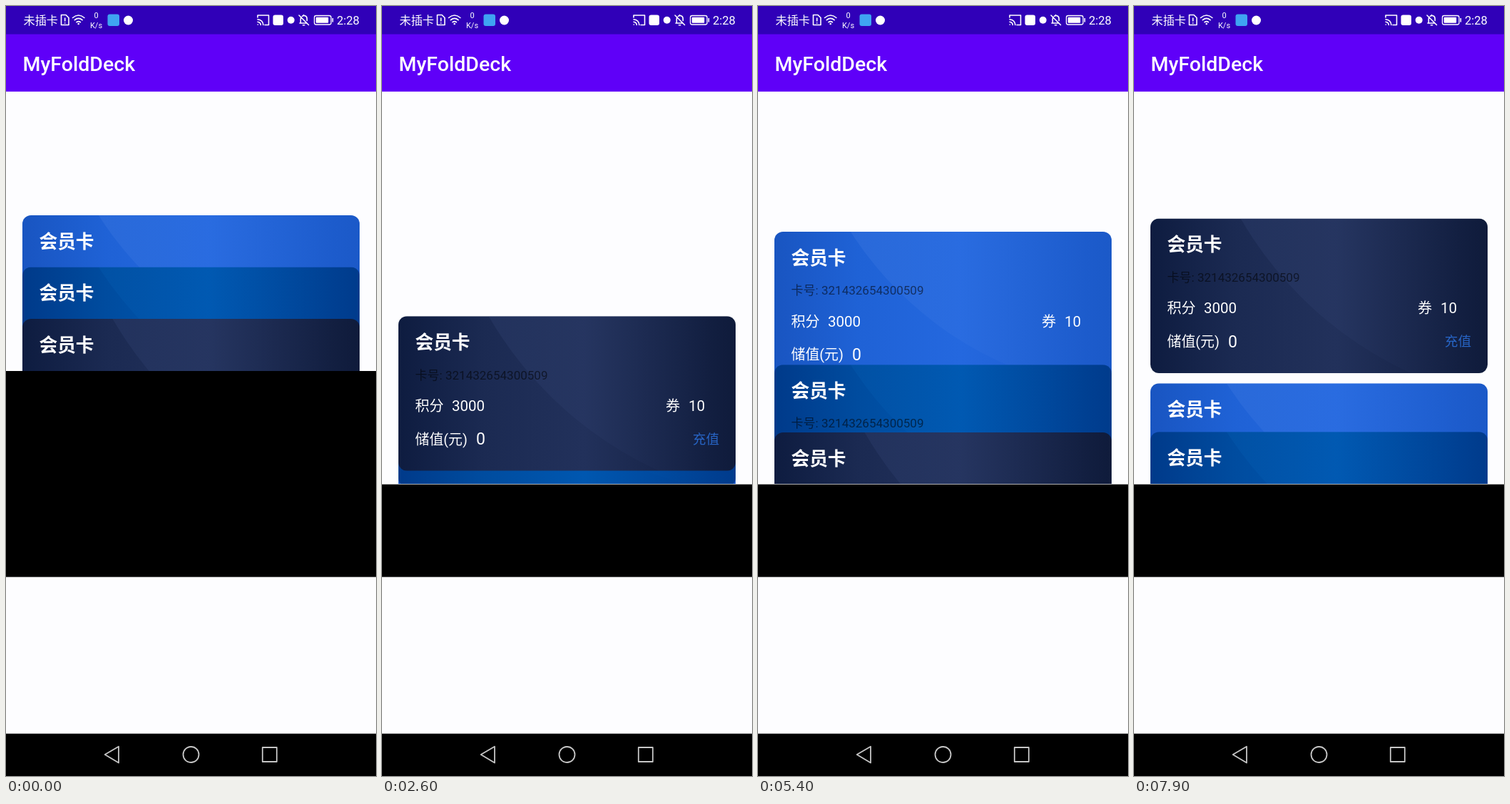
Write an HTML page that moves like this. It is 519 px wide and 1078 px high and loops after 8 s.

```html
<!DOCTYPE html>
<html lang="zh-CN">
<head>
<meta charset="utf-8">
<title>Card stack</title>
<style>
  html, body { margin: 0; width: 100%; height: 100%; overflow: hidden; background: #fdfdff; }
  svg { display: block; width: 100vw; height: 100vh; }
  text { font-family: Roboto, "Noto Sans CJK SC", "Noto Sans CJK", sans-serif; fill: #fff; }
  .line { fill: none; stroke: #fff; stroke-width: 1.6; stroke-linecap: round; stroke-linejoin: round; }
  .nav { fill: none; stroke: #c6c6c6; stroke-width: 1.8; stroke-linejoin: round; }
</style>
</head>
<body>
<svg viewBox="0 0 519 1078" preserveAspectRatio="none">
  <defs>
    <clipPath id="face"><rect width="473" height="216.5" rx="12"/></clipPath>
  </defs>
  <rect width="519" height="1078" fill="#fdfdff"/>
  <g id="cards"></g>
  <rect id="below" width="519" fill="#fdfdff"/>
  <rect id="black" width="519"/>

  <rect width="519" height="119.8" fill="#5f00f8"/>
  <rect width="519" height="39.5" fill="#3000b8"/>
  <text x="23.5" y="90.5" font-size="28.5" font-weight="500">MyFoldDeck</text>

  <text x="24.5" y="26" font-size="16.2">未插卡</text>
  <path class="line" d="M77.5 12.5h6.5l4 4v10h-10.5z"/>
  <path class="line" d="M82.7 17v4M82.7 23.8v.2"/>
  <path class="line" d="M93.5 16.5q8.2-7 16.4 0M96.3 19.7q5.4-4.5 10.8 0M99 22.7q2.7-2.2 5.4 0"/>
  <circle cx="101.7" cy="25" r="1.3" fill="#fff"/>
  <g font-size="11" text-anchor="middle">
    <text x="126.5" y="17">0</text>
    <text x="126.5" y="30.5">K/s</text>
  </g>
  <rect x="142.5" y="11.5" width="16.5" height="16.5" rx="3" fill="#3fa4f2"/>
  <circle cx="171.5" cy="20" r="6.5" fill="#fff"/>
  <path class="line" d="M353 16v-3h15.500v13.500h-5.500M353 18.800q7.300.7 7.800 7.700M353 22.200q4 .5 4.300 4.300M353.200 26h.2"/>
  <rect x="374.5" y="12.5" width="14.5" height="14.5" rx="3" fill="#fff"/>
  <circle cx="399.7" cy="19.7" r="5" fill="#fff"/>
  <path class="line" d="M411 13l13.5 13.5M412 24h9M413.3 24v-6q.2-1.5.8-2.5M415.5 14.3q2-1.5 4.2-.6 2.5 1 2.5 4.3v2.5M417.5 12.5v.5M416.5 26.7h2.2"/>
  <rect class="line" x="432.5" y="13.5" width="23.5" height="12.5" rx="2.5" style="stroke-width:1.3"/>
  <rect x="434.7" y="15.7" width="17.5" height="8.1" rx="1" fill="#fff"/>
  <rect x="457.5" y="17" width="1.6" height="5.5" fill="#fff"/>
  <text x="464" y="25.7" font-size="16.5">2:28</text>

  <rect y="1018.7" width="519" height="60"/>
  <path class="nav" d="M138.7 1048L158 1036.7V1059.5z"/>
  <circle class="nav" cx="259.5" cy="1048" r="11"/>
  <rect class="nav" x="359.8" y="1038" width="20" height="20"/>
</svg>
<script>
const LOOP = 8000, STEP = 100, FLOOR = 799.4, COVER = 288;
const $ = id => document.getElementById(id);

// Gradient across the face, arc centre and radius, arc tint, colour of the top-up link.
const styles = [
  { stops: ['#1955c1', '#1f62d6', '#2468df', '#1b59c8'], cx: 522, r: 493, glow: '#6f9cf0', link: '' },
  { stops: ['#003a8a', '#004c9f', '#0057b0', '#003b8c'], cx: 522, r: 493, glow: '#0a74cc', link: '#1760c2' },
  { stops: ['#0e1c40', '#1b2a52', '#22315b', '#0f1b3b'], cx: 585, r: 530, glow: '#5368a4', link: '#2764c4' }
];
const offsets = [0, .25, .55, 1];

const label = (x, y, size, str, extra = '') =>
  `<text x="${x}" y="${y}" font-size="${size}" ${extra}>${str}</text>`;

const card = ({ stops, cx, r, glow, link }, i) => `<g id="card${i}">
  <linearGradient id="tint${i}">${stops.map((c, k) =>
    `<stop offset="${offsets[k]}" stop-color="${c}"/>`).join('')}</linearGradient>
  <linearGradient id="glow${i}" gradientUnits="userSpaceOnUse" x1="100" x2="440">
    <stop offset="0" stop-color="${glow}" stop-opacity=".14"/>
    <stop offset="1" stop-color="${glow}" stop-opacity="0"/>
  </linearGradient>
  <g clip-path="url(#face)">
    <rect width="473" height="216.5" fill="url(#tint${i})"/>
    <circle cx="${cx}" cy="-266" r="${r}" fill="url(#glow${i})"/>
  </g>
  ${label(23.5, 45.7, 25.7, '会员卡', 'font-weight="700"')}
  ${label(23.5, 88.3, 17.05, '卡号: 321432654300509', 'style="fill:#000;fill-opacity:.54"')}
  ${label(23.5, 132.7, 20, '积分')}
  ${label(75, 132.7, 20.5, '3000')}
  ${label(375, 132.7, 20, '券')}
  ${label(407, 132.7, 20.5, '10')}
  ${label(23.5, 179.4, 19.9, '储值(元)')}
  ${label(109, 180.2, 23, '0')}
  ${link && label(450, 179, 18.6, '充值', `text-anchor="end" style="fill:${link}"`)}
</g>`;
$('cards').innerHTML = styles.map(card).join('');

// Tops of the three cards and how far the stack is opened.
const closed = [293, 365.5, 438, 0];
const first  = [293, 524.5, 597, 1];
const second = [531.5, 293, 597, 1];
const third  = [531, 597, 294, 1];
const moves = [
  [420, 16, first],
  [1554, 12, second],
  [2450, 12, third],
  [3450, 12, closed],
  [4430, 13, second],
  [5072, 12, first],
  [7360, 12, third]
];
// While opening, the black panel slides whole; later it is cut at FLOOR.
const sliding = t => t < 1400 || (t >= 4400 && t < 5000);

const spring = (t, rate) => {
  const x = Math.max(0, t) / 1000 * rate;
  return 1 - (1 + x) * Math.exp(-x);
};

function poseAt(t) {
  const pose = [...closed];
  let from = closed;
  for (const [start, rate, to] of moves) {
    const p = spring(t - start, rate);
    pose.forEach((_, k) => pose[k] += (to[k] - from[k]) * p);
    from = to;
  }
  return pose;
}

function place(rect, top, bottom) {
  rect.setAttribute('y', top);
  rect.setAttribute('height', bottom - top);
}

function draw(t) {
  const pose = poseAt(t), open = pose[3];
  styles.forEach((_, i) => $('card' + i).setAttribute('transform', `translate(23 ${pose[i].toFixed(2)})`));
  const top = 511 + 158.7 * open;
  place($('below'), 511 + 158 * open, 1019);
  place($('black'), top, sliding(t) ? top + COVER + .4 : FLOOR);
}

const begin = performance.now();
function tick() {
  const t = performance.now() - begin + 20;
  draw(Math.floor(t / STEP) * STEP % LOOP);
  requestAnimationFrame(tick);
}
tick();
</script>
</body>
</html>
```
